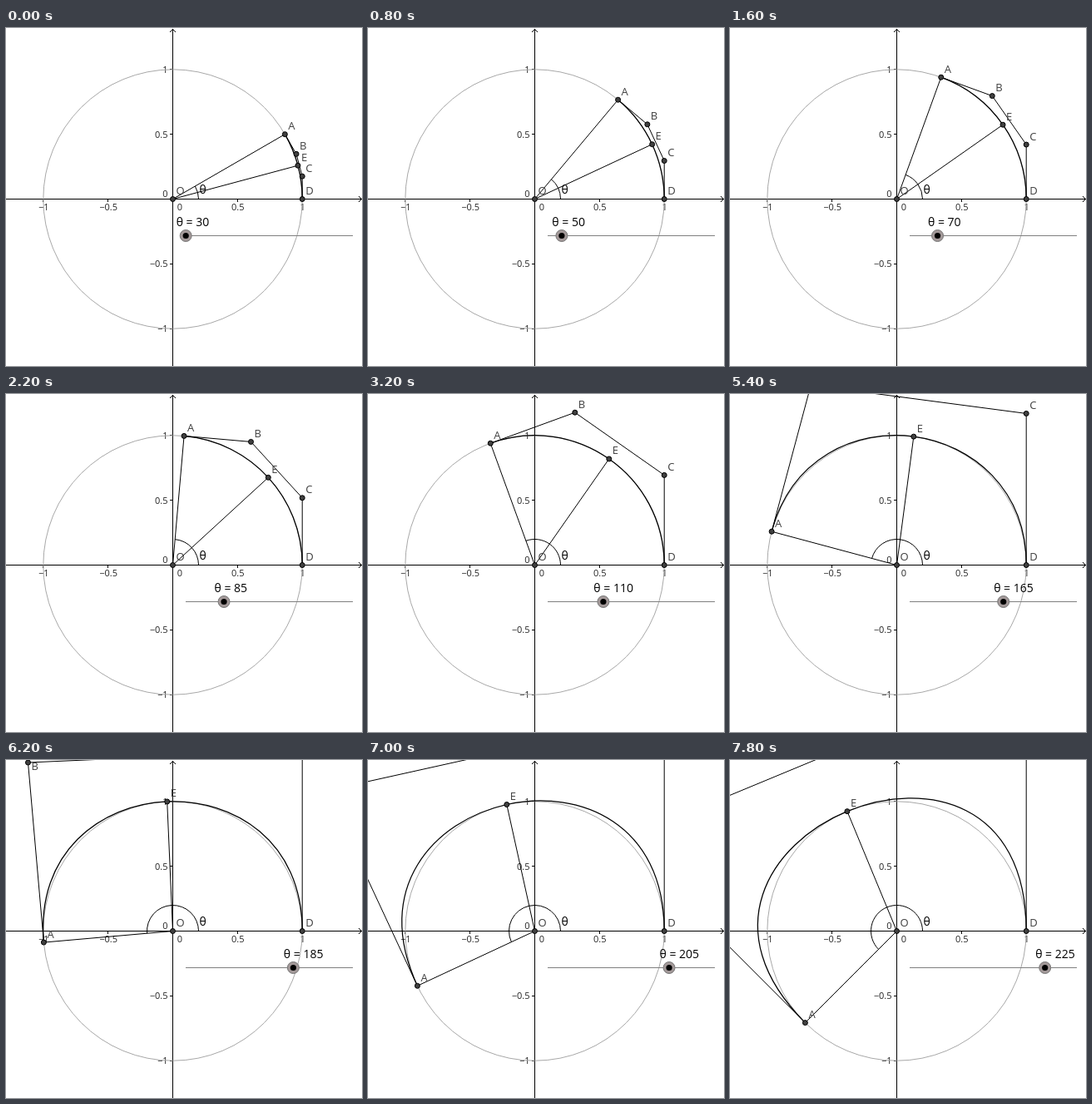
These frames come from a looping animation (428 by 406 pixels, 8 s). An HTML page:

```html
<!DOCTYPE html>
<html lang="en">
<head>
<meta charset="utf-8">
<title>Arc and Bézier curve</title>
<style>
html, body { margin: 0; width: 100%; height: 100%; overflow: hidden; background: #fff; }
svg { display: block; font: 13px "Open Sans", "Noto Sans", sans-serif; }
path, line, circle { fill: none; stroke: #000; stroke-width: 1; }
#unit { stroke: #a8a8a8; }
#curve { stroke-width: 1.25; }
#track { stroke: #808080; }
.point circle { fill: #404040; }
.point text { fill: #404040; }
.ticks text { font-size: 11px; fill: #222; }
.black { font-size: 14px; }
#halo { fill: #a39999; stroke: #777; }
#knob { fill: #000; stroke: none; }
</style>
</head>
<body>
<svg id="stage" width="428" height="406" viewBox="0 0 428 406">
  <path d="M0 205.5H428M200.5 1V406M197 5L200.5 1.5L204 5M424 202L427.5 205.5L424 209"/>
  <g class="ticks" id="ticks"></g>
  <circle id="unit" cx="200.5" cy="205.5" r="155.7"/>
  <path id="angle"/>
  <text class="black" x="232.5" y="199">θ</text>
  <path id="curve"/>
  <path id="frame"/>
  <line id="track" x1="216" y1="249.5" x2="417" y2="249.5"/>
  <g id="points"></g>
  <g id="slider">
    <circle id="halo" cy="249.5" r="7"/>
    <circle id="knob" cy="249.5" r="3.6"/>
    <text id="value" class="black" y="238"></text>
  </g>
</svg>
<script>
const UNIT = 155.7, OX = 200.5, OY = 205.5;
const STEP = 200, STEPS = 40;
const $ = id => document.getElementById(id);

function add(parent, tag, attrs, text = "") {
  const el = document.createElementNS("http://www.w3.org/2000/svg", tag);
  for (const key in attrs) el.setAttribute(key, attrs[key]);
  el.textContent = text;
  return parent.appendChild(el);
}
const set = (id, key, value) => $(id).setAttribute(key, value);
const screen = (x, y) => [OX + x * UNIT, OY - y * UNIT];
const polar = (angle, r = 1) => screen(r * Math.cos(angle), r * Math.sin(angle));

for (const v of [-1, -0.5, 0, 0.5, 1]) {
  const [x, y] = screen(v, v);
  const label = String(v).replace("-", "−");
  const px = Math.floor(x) + 0.5, py = Math.floor(y) + 0.5;
  if (v) add($("ticks"), "path", { d: `M${px} 205V209M197 ${py}H200` });
  add($("ticks"), "text", { x: v ? x + 0.5 : 209, y: 219, "text-anchor": "middle" }, label);
  add($("ticks"), "text", { x: 194.5, y: v ? y + 4 : 203, "text-anchor": "end" }, label);
}

const markers = {};
for (const name of "OABCDE") {
  const g = add($("points"), "g", { class: "point" });
  markers[name] = {
    g,
    dot: add(g, "circle", { r: 3 }),
    label: add(g, "text", {}, name)
  };
}

function place(name, [x, y]) {
  const { g, dot, label } = markers[name];
  g.setAttribute("display", y < -6 || x < -6 ? "none" : "inline");
  dot.setAttribute("cx", x);
  dot.setAttribute("cy", y);
  label.setAttribute("x", x + 4);
  label.setAttribute("y", Math.max(12, y - 5.5));
}

function draw(degrees) {
  const theta = degrees * Math.PI / 180;
  const cos = Math.cos(theta), sin = Math.sin(theta);
  const k = 4 / 3 * Math.tan(theta / 4);
  const O = screen(0, 0), A = screen(cos, sin), D = screen(1, 0);
  const B = screen(cos + k * sin, sin - k * cos), C = screen(1, k);
  const E = polar(theta / 2);
  const points = { O, A, B, C, D, E };
  for (const name in points) place(name, points[name]);

  set("frame", "d", `M${E}L${O}L${A}L${B}L${C}L${D}`);
  set("curve", "d", `M${A}C${B} ${C} ${D}`);
  const p = (degrees - 30) / 195;
  const dim = 64 - 14 * p;
  set("curve", "stroke", `rgb(${64 + 166 * p},${dim},${dim})`);
  set("angle", "d", `M231.5 ${OY}A31 31 0 ${degrees > 180 ? 1 : 0} 0 ${polar(theta, 31 / UNIT)}`);

  const x = 216.2 + (degrees - 30) / 1.2;
  set("halo", "cx", x);
  set("knob", "cx", x);
  set("value", "x", x - 11.5);
  $("value").textContent = `θ = ${degrees}`;
}

function tick() {
  draw(30 + 5 * (Math.floor(performance.now() / STEP) % STEPS));
  requestAnimationFrame(tick);
}
tick();
</script>
</body>
</html>
```
